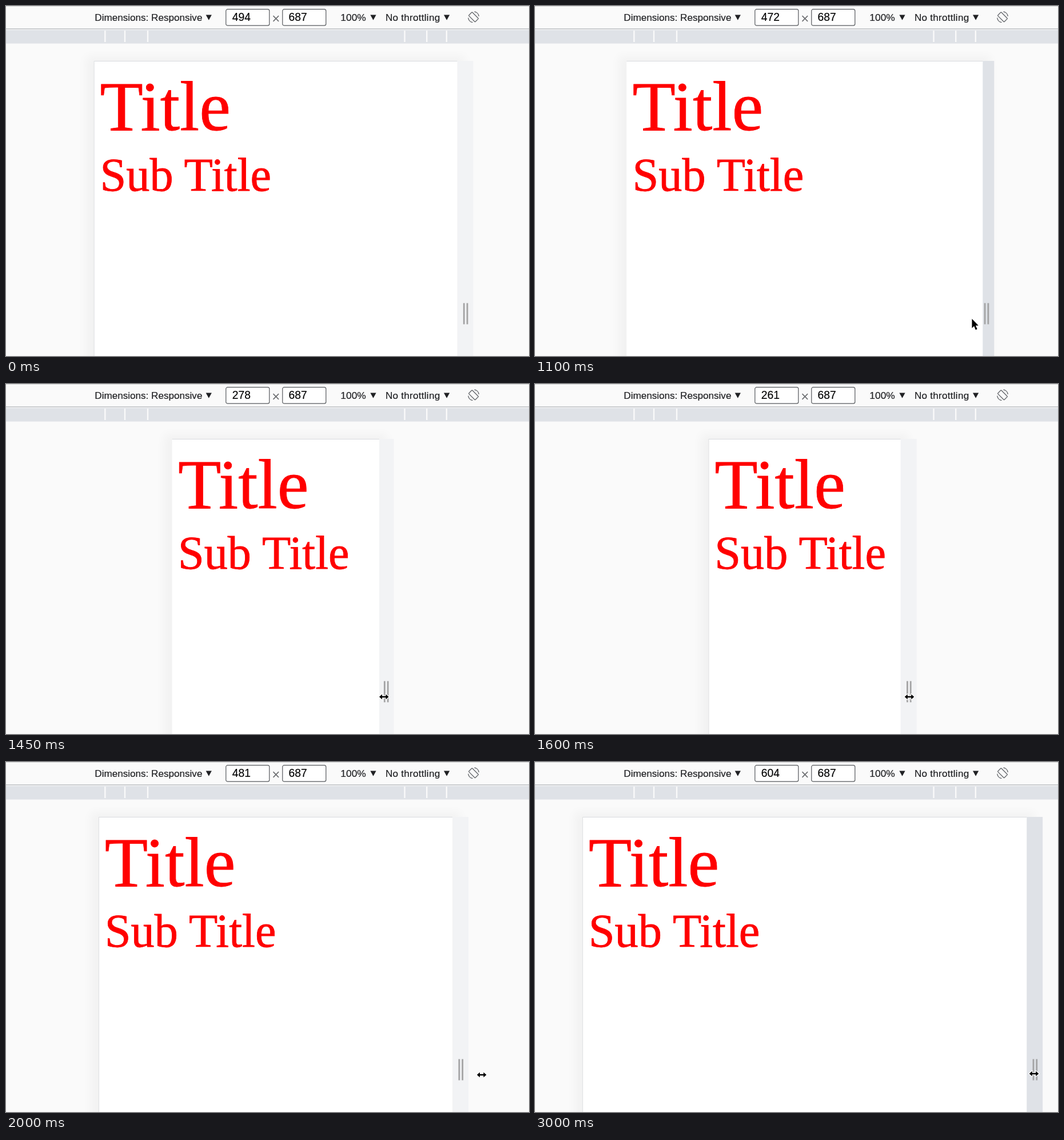
An HTML page for the animation above (3.75 s loop, 915 by 612 pixels).

```html
<!DOCTYPE html>
<html lang="en">
<head>
<meta charset="utf-8">
<title>Responsive resize</title>
<style>
  html, body { margin: 0; width: 100%; height: 100%; overflow: hidden; background: #fafafa; }
  svg { display: block; width: 100%; height: 100%; }
  .ui { font-family: "Liberation Sans", Arial, sans-serif; font-size: 17.1px; fill: #202124; }
  .ui text { stroke: #202124; stroke-width: .2; }
  .ui .field { font-size: 19.3px; fill: #000; }
  .doc { font-family: "Liberation Serif", "Times New Roman", serif; fill: #f00; stroke: #f00; stroke-width: .8; }
</style>
</head>
<body>
<svg viewBox="0 0 915 612" preserveAspectRatio="none">
  <defs>
    <filter id="blur" x="-20%" y="-20%" width="140%" height="140%">
      <feGaussianBlur stdDeviation="8.5"/>
    </filter>
    <path id="caret" d="M0 0h10.2l-5.1 9.4z"/>
    <path id="tick" d="M0 43v20" stroke="#fafafa" stroke-width="2.4"/>
    <rect id="box" y="5.7" width="76" height="28.5" rx="3" fill="#fff" stroke="#55585c" stroke-width="1.2"/>
  </defs>
  <rect width="915" height="612" fill="#fafafa"/>

  <rect id="shadow" y="87.7" height="660" rx="3" opacity=".032" filter="url(#blur)"/>
  <g id="strip">
    <rect id="stripBg" y="96" width="28" height="520"/>
    <path d="M11.8 519.5V556.5M17.6 519.5V556.5" stroke="#a4a4a5" stroke-width="2.8"/>
  </g>
  <rect id="page" y="96" height="520" fill="#fff"/>
  <path id="topEdge" stroke="#dadcdf"/>
  <path id="leftEdge" stroke="#dfe0e2"/>
  <g id="doc" class="doc">
    <text y="217.3" font-size="123.4">Title</text>
    <text y="323" font-size="82.3">Sub Title</text>
  </g>

  <rect width="915" height="40" fill="#fafafa"/>
  <rect width="915" height="1" fill="#d4d5d6"/>
  <rect y="39" width="915" height="2" fill="#cbcdd0"/>
  <rect y="42" width="915" height="23.6" fill="#dfe2e7"/>
  <use href="#tick" x="173.3"/><use href="#tick" x="208"/><use href="#tick" x="248"/>
  <use href="#tick" x="697.5"/><use href="#tick" x="736.2"/><use href="#tick" x="770.8"/>
  <g class="ui">
    <text x="155.3" y="26">Dimensions: Responsive</text>
    <text x="585.3" y="26" font-size="17.4">100%</text>
    <text x="664" y="26" letter-spacing=".25">No throttling</text>
    <use href="#caret" x="349.7" y="15.4"/>
    <use href="#caret" x="637.4" y="15.4"/>
    <use href="#caret" x="766" y="15.4"/>
    <use href="#box" x="384.8"/>
    <use href="#box" x="483.8"/>
    <text id="width" class="field" x="395.8" y="26"></text>
    <text class="field" x="494.6" y="26">687</text>
  </g>
  <path d="M467.5 17.2l9.6 9.6M477.1 17.2l-9.6 9.6" stroke="#6c6e71" stroke-width="1.7"/>
  <g fill="none" stroke="#606367" stroke-width="1.3">
    <rect x="-4.3" y="-8" width="8.6" height="16" rx="1" transform="translate(818 19.3) rotate(-45)"/>
    <path d="M819.5 10a9 9 0 0 1 7.8 8M816.5 28.6a9 9 0 0 1-7.8-8"/>
  </g>

  <g stroke="#fff" stroke-linejoin="round" paint-order="stroke" stroke-width="2.4">
    <path id="arrow" d="M0 0V16.2L3.7 12.8 6.4 19.2 9.2 18 6.5 11.8H11.3Z"/>
    <path id="resize" d="M-8.3 0L-3.2 -4.6V-1.2H3.2V-4.6L8.3 0 3.2 4.6V1.2H-3.2V4.6Z"/>
  </g>
</svg>
<script>
const LOOP = 3750, STEP = 50;
const MID = 471.8, SCALE = 1.286;

const $ = id => document.getElementById(id);
const set = (id, attrs) => {
  for (const k in attrs) $(id).setAttribute(k, attrs[k]);
};
const show = on => on ? 'visible' : 'hidden';
const within = (t, a, b) => t >= a && t < b;
const ramp = (t, a, b) => Math.min(1, Math.max(0, (t - a) / (b - a)));
const smooth = u => u * u * (3 - 2 * u);
const easeOut = u => 1 - (1 - u) ** 1.6;
const bezier = (u, a, b, c) => (1 - u) ** 2 * a + 2 * u * (1 - u) * b + u * u * c;

// Drag narrower, drag wider, then a small nudge back.
const widthAt = t => Math.round(
  494 - 233 * smooth(ramp(t, 997, 1540)) + 345 * ramp(t, 1650, 2200) - 2 * ramp(t, 2600, 3000));

// The page repaints late while it shrinks.
const lagAt = t => within(t, 1100, 1600) ? (1600 - t) / 40 : 0;

function mouseAt(t) {
  const u = easeOut(ramp(t, 50, 600));
  return [
    bezier(u, 246, 650, 794) - 139 * smooth(ramp(t, 919, 1528))
      + 221 * easeOut(ramp(t, 1650, 2200)) - 3 * ramp(t, 2350, 3000),
    bezier(u, 300, 690, 551) - 4 * smooth(ramp(t, 600, 1100)) - 2 * ramp(t, 2350, 3000)
  ];
}

function draw(ms) {
  const t = Math.floor(ms % LOOP / STEP) * STEP;
  const width = widthAt(t), lag = lagAt(t);
  const half = (width + lag) * SCALE / 2;
  const left = MID - half, right = MID + half;

  $('width').textContent = width;
  set('page', { x: left, width: half * 2 });
  set('shadow', { x: left - 14, width: half * 2 + 28 });
  set('topEdge', { d: `M${left} 96.5H${right}` });
  set('leftEdge', { d: `M${left} 96V612`, visibility: show(!lag) });
  set('doc', { transform: `translate(${left + 10.3})` });

  const hot = within(t, 650, 1200) || t >= 2650;
  set('strip', { transform: `translate(${MID + width * SCALE / 2})` });
  set('stripBg', { fill: hot ? '#dfe2e7' : '#f2f3f5' });

  const transform = `translate(${mouseAt(t)})`;
  const pointing = within(t, 50, 600) || within(t, 1050, 1400);
  set('arrow', { transform, visibility: show(pointing) });
  set('resize', { transform, visibility: show(t >= 50 && !pointing) });
}

const start = performance.now();
function tick() {
  draw(performance.now() - start);
  requestAnimationFrame(tick);
}
tick();
</script>
</body>
</html>
```
